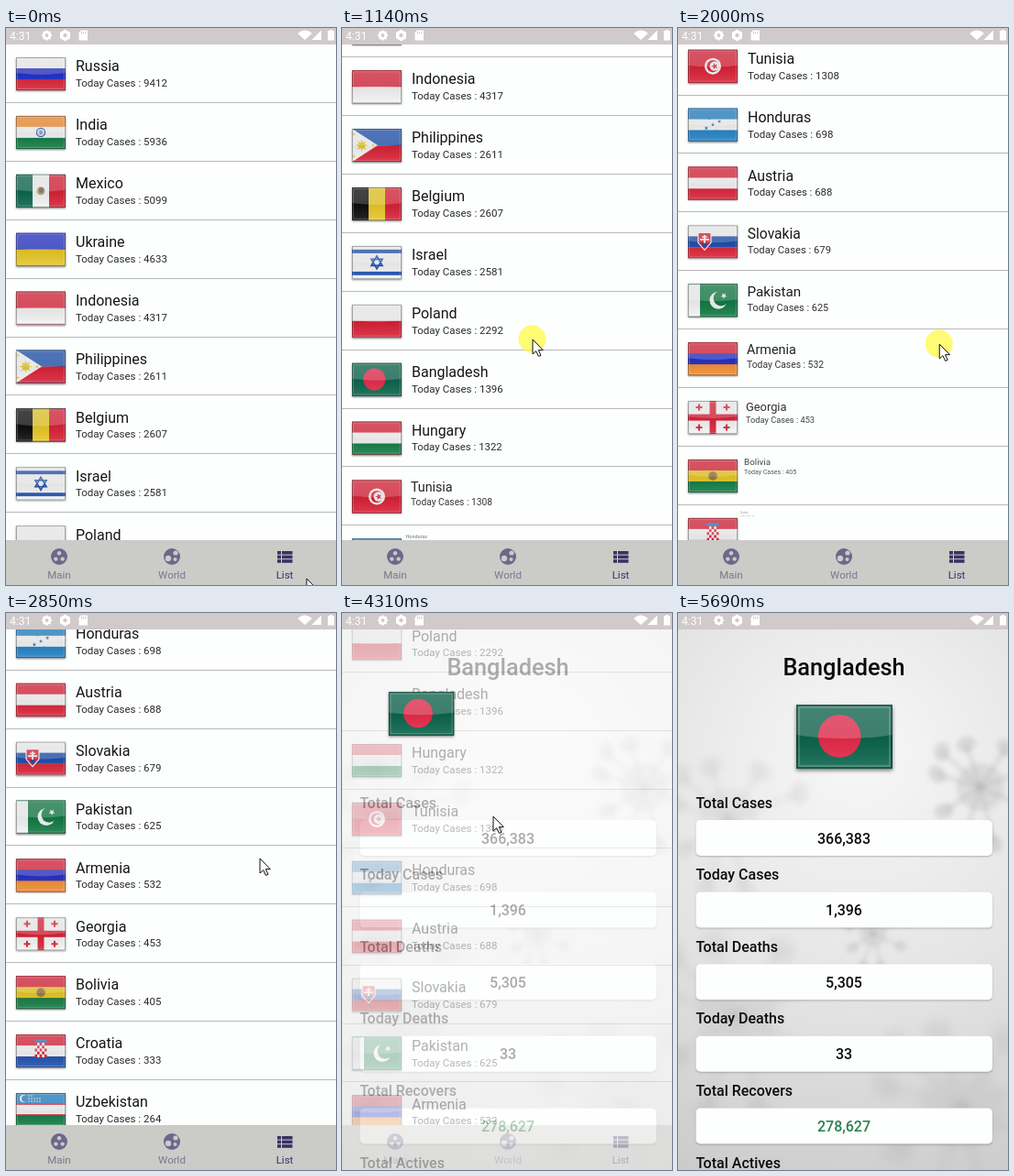
Write an HTML page with a canvas that moves like this. It is 360 px wide and 608 px high and loops after 6470 ms.

```html
<!DOCTYPE html>
<html lang="en">
<head>
<meta charset="utf-8">
<title>Country list</title>
<style>
html, body { margin: 0; width: 100%; height: 100%; overflow: hidden; background: #fff; }
canvas { display: block; width: 360px; height: 608px; }
</style>
</head>
<body>
<canvas id="stage" width="360" height="608"></canvas>
<script>
const LOOP = 6470, STEP = 76.8, LAST = 74, PITCH = 63.9, TOP = 18, NAV = 559, TAU = Math.PI * 2;
const screen = document.getElementById('stage').getContext('2d');
const layer = () => Object.assign(document.createElement('canvas'), { width: 360, height: 608 }).getContext('2d');
const listLayer = layer(), pageLayer = layer();
let c = screen;

// Drawing helpers
function rect(x, y, w, h, fill) { c.fillStyle = fill; c.fillRect(x, y, w, h); }
function disc(x, y, r, fill) {
  c.fillStyle = fill; c.beginPath(); c.arc(x, y, r, 0, TAU); c.fill();
}
function poly(points, fill, stroke, width = 1) {
  c.beginPath();
  points.forEach(([x, y]) => c.lineTo(x, y));
  c.closePath();
  if (fill) { c.fillStyle = fill; c.fill(); }
  if (stroke) { c.strokeStyle = stroke; c.lineWidth = width; c.stroke(); }
}
// n points around a centre, the first one straight up unless turned
const ring = (x, y, r, n, turn = 0) => Array.from({ length: n }, (_, i) => {
  const a = turn + i * TAU / n;
  return [x + r * Math.sin(a), y - r * Math.cos(a)];
});
function star(x, y, r, n, inner, fill, turn = 0) {
  const tips = ring(x, y, r, n, turn), dents = ring(x, y, r * inner, n, turn + Math.PI / n);
  poly(tips.flatMap((tip, i) => [tip, dents[i]]), fill);
}
function cross(x, y, size, width, fill) {
  rect(x - size, y - width / 2, size * 2, width, fill);
  rect(x - width / 2, y - size, width, size * 2, fill);
}
function text(str, x, y, size, fill, weight = 400, align = 'left') {
  c.font = `${weight} ${size}px Roboto, sans-serif`;
  c.textAlign = align; c.fillStyle = fill; c.fillText(str, x, y);
}
function blend(g, ...colors) {
  colors.forEach((color, i) => g.addColorStop(i / (colors.length - 1), color));
  return g;
}

// Flags: 54 x 36, stripes given by palette letters, '|' for upright stripes
const ink = {
  w: '#f4f4f4', r: '#da2036', u: '#2330c6', b: '#1c4fae', l: '#2080c4',
  y: '#e8c824', o: '#f08c30', g: '#0f7a42', d: '#0a654b', k: '#0b0b0b'
};
const rows = [
  ['Russia', 9412, 'wur'], ['India', 5936, 'owg'], ['Mexico', 5099, '|dwr'], ['Ukraine', 4633, 'uy'],
  ['Indonesia', 4317, 'rw'], ['Philippines', 2611, 'br'], ['Belgium', 2607, '|kyr'],
  ['Israel', 2581, 'wbwwwwwbw'], ['Poland', 2292, 'wr'], ['Bangladesh', 1396, 'd'],
  ['Hungary', 1322, 'rwg'], ['Tunisia', 1308, 'r'], ['Honduras', 698, 'lwl'], ['Austria', 688, 'rwr'],
  ['Slovakia', 679, 'wbr'], ['Pakistan', 625, 'g'], ['Armenia', 532, 'ruo'], ['Georgia', 453, 'w'],
  ['Bolivia', 405, 'ryg'], ['Croatia', 333, 'rwb'], ['Uzbekistan', 264, 'lwg']
];
const HERO = 9;
const emblems = {
  India() {
    disc(27, 18, 5.2, ink.b); disc(27, 18, 4, ink.w); star(27, 18, 4.5, 12, .3, '#7183b8');
  },
  Mexico() { disc(27, 18, 4.5, '#a9ab8c'); disc(27.5, 17, 2.8, '#7b5b3c'); },
  Philippines() {
    poly([[0, 0], [28, 18], [0, 36]], ink.w);
    star(10.5, 18, 7, 8, .45, ink.y);
    ring(9, 18, 14, 3, TAU / 4).forEach(([x, y]) => star(x, y, 2.2, 5, .4, ink.y));
  },
  Israel() {
    [0, Math.PI].forEach(turn => poly(ring(27, 18, 7, 3, turn), null, ink.b, 1.6));
  },
  Bangladesh() { disc(24.3, 17.7, 12, '#e9294a'); },
  Tunisia() {
    disc(27, 18, 9, ink.w); disc(27, 18, 6.6, ink.r); disc(28.8, 18, 5.2, ink.w);
    star(29, 18, 3.8, 5, .4, ink.r, -.3);
  },
  Honduras() {
    [[27, 18], ...ring(27, 18, 8, 4, 1.1)].forEach(([x, y]) => star(x, y, 2.2, 5, .45, ink.l));
  },
  Slovakia() {
    poly([[11, 8], [25, 8], [25, 19], [18, 27], [11, 19]], ink.r, ink.w, 1.2);
    cross(18, 15.5, 5, 1.8, ink.w);
    rect(15, 12, 6, 1.5, ink.w);
    disc(18, 22, 2.5, ink.b);
  },
  Pakistan() {
    rect(0, 0, 13, 36, ink.w);
    disc(33, 18, 9.5, ink.w); disc(36, 15.8, 8.4, ink.g);
    star(39, 13, 3.6, 5, .4, ink.w, .6);
  },
  Georgia() {
    rect(23.5, 0, 7, 36, ink.r); rect(0, 14.5, 54, 7, ink.r);
    for (const x of [12, 42]) for (const y of [7, 29]) cross(x, y, 3.5, 2, ink.r);
  },
  Bolivia() { disc(27, 18, 5, '#8c8a3a'); disc(27, 17, 3, '#a5623a'); },
  Croatia() {
    for (let i = 0; i < 25; i++) rect(20.5 + i % 5 * 2.6, 9 + (i / 5 | 0) * 3.2, 2.6, 3.2, i % 2 ? ink.w : ink.r);
    rect(20.5, 5.5, 13, 3, ink.l);
  },
  Uzbekistan() {
    for (const y of [11.5, 23.2]) rect(0, y, 54, 1.4, ink.r);
    disc(8, 6, 4, ink.w); disc(9.6, 6, 3.6, ink.l);
    for (let i = 0; i < 12; i++) disc(14 + i % 5 * 3, 9 - (i / 5 | 0) * 3, .8, ink.w);
  }
};

function flag([name, , stripes], x, y, scale = 1) {
  const upright = stripes[0] === '|', colors = [...stripes.replace('|', '')].map(k => ink[k]), n = colors.length;
  c.save();
  c.translate(x, y); c.scale(scale, scale);
  c.save();
  c.shadowColor = 'rgba(0,0,0,.5)'; c.shadowBlur = 2 * scale; c.shadowOffsetY = scale;
  rect(0, 0, 54, 36, colors[0]);
  c.restore();
  c.save();
  c.beginPath(); c.rect(0, 0, 54, 36); c.clip();
  colors.forEach((color, i) => upright
    ? rect(54 * i / n, 0, 54 / n + .2, 36, color)
    : rect(0, 36 * i / n, 54, 36 / n + .2, color));
  emblems[name]?.();
  // Curved gloss over the upper half, soft shade below it
  rect(0, 0, 54, 36, blend(c.createLinearGradient(0, 16, 0, 36), 'rgba(0,0,0,.07)', 'rgba(255,255,255,.12)'));
  c.fillStyle = blend(c.createLinearGradient(0, 0, 0, 20), 'rgba(255,255,255,.24)', 'rgba(255,255,255,.2)');
  c.beginPath(); c.ellipse(27, 0, 60, 19, 0, 0, TAU); c.fill();
  c.restore();
  c.lineWidth = 1; c.strokeStyle = 'rgba(0,0,0,.3)'; c.strokeRect(.5, .5, 53, 35);
  c.strokeStyle = 'rgba(255,255,255,.2)'; c.strokeRect(1.5, 1.5, 51, 33);
  c.restore();
}

// Motion, in steps of time
const phase = (t, start, length) => Math.min(1, Math.max(0, (t - start) / length));
const smooth = u => u * u * (3 - 2 * u);
// start, length, distance
const flings = [[3, 6, 98], [8, 8.1, 151], [17.58, 11, 537], [37.5, 6.05, -258]];
const scrollAt = t => flings.reduce((sum, [start, length, d]) => sum + d * smooth(phase(t, start, length)), 0);
const isPressed = t => t === 52 || t === 53 ||
  flings.some(([start, length]) => t > start && phase(t, start, length) < .9);
// step, x, y
const stops = [[0, 328, 601], [8, 212, 480], [15, 208, 340], [21, 305, 530], [28.8, 277, 268], [37, 277, 268],
  [43, 193, 393], [45, 173, 201], [53, 125, 98], [56, 165, 222], [63, 69, 505], [72, 195, 593], [74, 340, 640]];
function pointerAt(t) {
  const j = Math.max(1, stops.findIndex(s => s[0] >= t));
  const [from, x0, y0] = stops[j - 1], [to, x1, y1] = stops[j];
  const u = smooth(phase(t, from, to - from));
  return [x0 + (x1 - x0) * u, y0 + (y1 - y0) * u];
}
// Step at which each row first enters the view
const entered = rows.map((_, i) => {
  const need = TOP + PITCH * i - NAV;
  if (need <= 0) return -LAST;
  let t = 0;
  while (scrollAt(t) < need && t < LAST) t += .1;
  return t;
});

function statusBar() {
  const bar = '#d0caca', white = '#fff';
  rect(0, 0, 360, TOP, bar);
  text('4:31', 4, 12.5, 12, white);
  star(44.5, 8, 6, 8, .75, white); disc(44.5, 8, 2, bar);
  star(64.5, 8, 6.5, 6, .85, white); disc(64.5, 8, 2.2, bar);
  poly([[82, 2.5], [89, 2.5], [89, 13.5], [79.5, 13.5], [79.5, 5]], white);
  for (let x = 82; x < 88; x += 2.2) rect(x, 4, 1, 2.5, bar);
  c.fillStyle = white;
  c.beginPath(); c.moveTo(326, 13); c.arc(326, 13, 10.5, -TAU * .385, -TAU * .115); c.fill();
  poly([[344, 2.5], [344, 13], [333.5, 13]], white);
  rect(351, 3, 7, 10.5, white); rect(353, 2, 3, 1.5, white);
}

function navBar() {
  const bar = '#cbcbc7', dim = '#6d678c', active = '#3b3163';
  rect(0, NAV, 360, 49, bar);
  disc(58, 577, 9, dim);
  ring(58, 577.5, 4.2, 3).forEach(([x, y]) => disc(x, y, 2.2, bar));
  disc(181, 577, 9, dim);
  disc(185, 573, 2.6, bar); disc(177, 579, 3.2, bar); disc(184.5, 580, 2, bar);
  for (let y = 571; y < 582; y += 4.6) {
    rect(296, y, 4, 3.6, active);
    rect(301, y, 11.5, 3.6, active);
  }
  ['Main', 'World', 'List'].forEach((label, i) =>
    text(label, 58 + 123 * i, 601, 11.5, i === 2 ? active : '#7b778c', 400, 'center'));
}

function drawList(t, hideHero) {
  c = listLayer;
  rect(0, 0, 360, 608, '#fdfefe');
  const scroll = scrollAt(t);
  rows.forEach((row, i) => {
    const y = TOP + PITCH * i - scroll;
    if (y < -PITCH || y > NAV) return;
    rect(0, Math.round(y + PITCH - 1), 360, 1, '#b9b9b9');
    if (!(hideHero && i === HERO)) flag(row, 11, y + 14);
    const size = 1 - .47 ** Math.max(0, t - entered[i] - .35);
    if (size < .02) return;
    c.save();
    c.translate(66, y + 5); c.scale(size, size);
    c.globalAlpha = Math.sqrt(size);
    text(row[0], 10, 24.3, 16, '#161616');
    text('Today Cases : ' + row[1], 10, 41, 11.5, '#2a2a2a');
    c.restore();
  });
  navBar();
}

function virus(x, y, r, alpha) {
  c.save();
  c.globalAlpha = alpha; c.filter = `blur(${1 + r / 14}px)`;
  c.strokeStyle = '#aaa'; c.lineWidth = r / 7 + 1;
  ring(x, y, r * 2.2, 9, 2).forEach(([px, py], i) => {
    const bend = r * .4 * Math.sin(i * 5);
    c.beginPath(); c.moveTo(x, y); c.lineTo(px + bend, py - bend); c.stroke();
    c.fillStyle = '#999';
    c.beginPath(); c.ellipse(px + bend, py - bend, r / 3 + 2, r / 4 + 2, i, 0, TAU); c.fill();
  });
  disc(x, y, r, '#aaa');
  c.restore();
}

function drawPage() {
  const black = '#0c0c0c';
  c = pageLayer;
  rect(0, 0, 360, 608, blend(c.createRadialGradient(195, 150, 30, 195, 210, 450), '#f5f5f5', '#e4e4e4', '#cacaca'));
  [[330, 190, 26, .26], [213, 350, 15, .2], [55, 225, 32, .12], [65, 440, 44, .13], [310, 540, 46, .13]]
    .forEach(v => virus(...v));
  text('Bangladesh', 181, 67.7, 25.3, black, 500, 'center');
  const stats = { 'Total Cases': '366,383', 'Today Cases': '1,396', 'Total Deaths': '5,305',
    'Today Deaths': '33', 'Total Recovers': '278,627', 'Total Actives': '' };
  Object.entries(stats).forEach(([label, value], i) => {
    const y = 226 + 78.6 * i;
    text(label, 19.5, y - 13.5, 16, black, 500);
    c.save();
    c.shadowColor = 'rgba(0,0,0,.25)'; c.shadowBlur = 2; c.shadowOffsetY = 1;
    c.fillStyle = '#fdfefe';
    c.beginPath(); c.roundRect(19.5, y, 323.5, 39, 5); c.fill();
    c.restore();
    text(value, 181, y + 25.5, 16, i === 4 ? '#2e8050' : black, 500, 'center');
  });
}

function pointer(t) {
  const [x, y] = pointerAt(t);
  if (isPressed(t)) disc(x - .5, y - .5, 15, 'rgba(255,250,70,.75)');
  c.save();
  c.translate(x, y);
  poly([[0, 0], [0, 16], [3.7, 12.6], [6.4, 18.4], [9, 17.3], [6.3, 11.6], [11.3, 11.6]], '#fff', '#111');
  c.restore();
}

function render(ms) {
  const t = Math.min(LAST, Math.floor((ms + 12) / STEP));
  const open = smooth(phase(t, 53.5, 6.4));
  if (open < 1) drawList(t, open > 0);
  c = screen;
  rect(0, 0, 360, 608, '#fff');
  c.globalAlpha = Math.max(0, 1 - 1.5 * open);
  c.drawImage(listLayer.canvas, 0, 0);
  c.globalAlpha = open;
  c.drawImage(pageLayer.canvas, 0, 0);
  c.globalAlpha = 1;
  if (open) flag(rows[HERO], 11 + 118 * open, 79.1 + 20.9 * open, 1 + open * 51 / 54);
  statusBar();
  pointer(t);
}

drawPage();
const start = performance.now();
(function tick() {
  render((performance.now() - start) % LOOP);
  requestAnimationFrame(tick);
})();
</script>
</body>
</html>
```
